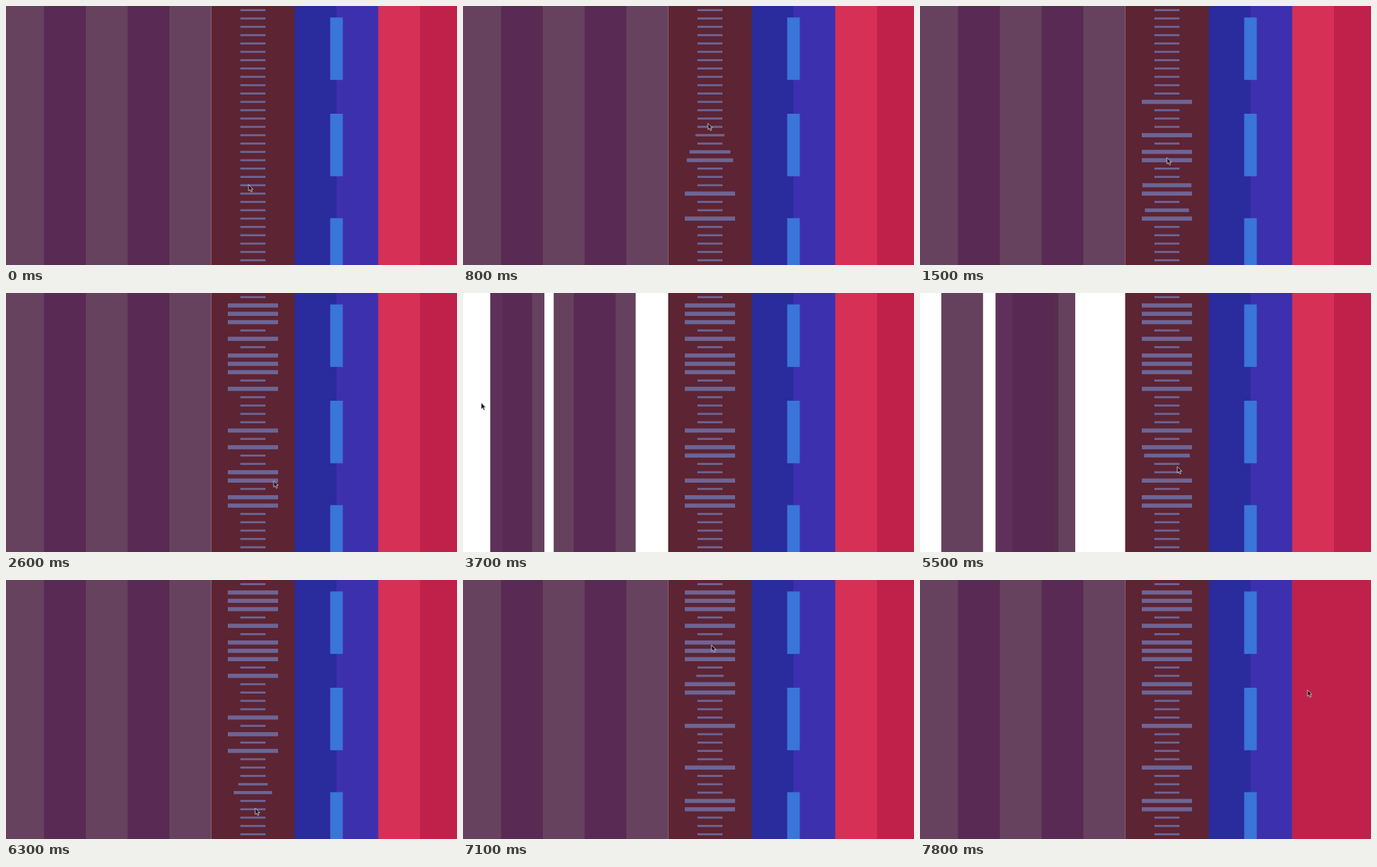
Write an HTML page with a canvas that moves like this. It is 610 px wide and 351 px high and loops after 8000 ms.

```html
<!DOCTYPE html>
<html lang="en">
<head>
<meta charset="utf-8">
<title>Interactive stripes</title>
<style>
html, body { margin: 0; width: 100%; height: 100%; overflow: hidden; background: #fff; }
canvas { display: block; }
</style>
</head>
<body>
<canvas id="stage" width="610" height="351"></canvas>
<script>
const ctx = document.getElementById('stage').getContext('2d');
const LOOP = 8000, W = 610, H = 351, COL = 56.5, TICKS = 31;

const slotX = slot => -5 + COL * slot;
const tickY = i => 5.6 + 11.3 * i;
const clamp = v => Math.min(1, Math.max(0, v));
const mix = (a, b, p) => a + (b - a) * p;
const ease = p => p * p * (3 - 2 * p);

function rect(x, y, w, h, color) {
  ctx.fillStyle = color;
  ctx.fillRect(x, y, w, h);
}

// Left strips: A, B and C are light, D and E dark; each shuffle leads to the next order.
const LIGHT = '#66425f', LIGHT_MOVING = 'rgba(85,45,77,.9)', DARK = 'rgba(89,41,84,.96)';
const orders = ['ADBEC', 'DCEBA', 'CDEBA', 'ABCED', 'ADCEB'];
const shuffleStarts = [3621, 3861, 5414, 5654];
const SHUFFLE_TIME = 240;

function drawStrips(t) {
  const n = shuffleStarts.filter(start => start <= t).length;
  const p = n ? clamp((t - shuffleStarts[n - 1]) / SHUFFLE_TIME) : 1;
  const moving = p < 1;
  const from = orders[Math.max(0, n - 1)], to = orders[n];

  rect(0, 0, slotX(5), H, moving ? '#fff' : LIGHT);
  for (const name of moving ? 'ABCDE' : 'DE') {
    const slot = mix(from.indexOf(name), to.indexOf(name), ease(p));
    rect(slotX(slot), 0, COL, H, name < 'D' ? LIGHT_MOVING : DARK);
  }
}

// Pointer stops: time, x, y, and the ticks it switches on the way there.
const stops = [
  [0, 328, 242],
  [100, 328, 242],
  [400, 336, 292, [22, 25]],
  [900, 330, 126, [18, 17, 15, 11]],
  [1150, 388, 338],
  [1320, 334, 236],
  [1380, 336, 290, [21, 24]],
  [1500, 334, 206],
  [1800, 336, 54, [17, 16, 15, 9, 8, 7, 5]],
  [2030, 335, 10, [3, 2, 1]],
  [2400, 415, 335],
  [2700, 336, 215, [21, 19]],
  [2900, 305, 20],
  [3200, 112, 240],
  [3400, 112, 240],
  [3700, 24.5, 149],
  [4100, 58, 94],
  [4250, 58, 94],
  [4650, 130, 335],
  [5100, 205, 180],
  [5300, 205, 180],
  [5500, 348, 235, [19, 20]],
  [5650, 344, 262, [22]],
  [6100, 334, 265],
  [6300, 337, 309, [24, 25]],
  [6420, 337, 325, [27]],
  [7050, 336, 88, [26, 22, 20, 18, 17, 16, 13, 12, 11]],
  [7200, 336, 88],
  [7780, 524, 149],
  [LOOP, 524, 149]
];

// A tick switches at the moment the pointer passes its height.
const flips = Array.from({ length: TICKS }, () => []);
const FLIP_TIME = 200;
stops.forEach(([t1, , y1, ticks = []], n) => {
  for (const i of ticks) {
    const [t0, , y0] = stops[n - 1];
    flips[i].push(mix(t0, t1, (tickY(i) - y0) / (y1 - y0)));
  }
});

function tickSize(i, t) {
  const past = flips[i].filter(start => start <= t);
  if (!past.length) return 0;
  const p = ease(clamp((t - past[past.length - 1]) / FLIP_TIME));
  return past.length % 2 ? p : 1 - p;
}

function drawTicks(t) {
  for (let i = 0; i < TICKS; i++) {
    const size = tickSize(i, t);
    const w = mix(34, 68, size), h = mix(2.7, 5.6, size);
    rect(334 - w / 2, tickY(i) - h / 2, w, h, '#6d6595');
  }
}

// Each column runs to the right edge, so that neighbours join without a seam.
function column(slot, color) {
  rect(slotX(slot), 0, W, H, color);
}

function drawColumns(t) {
  const p = clamp((t - 7600) / 150);
  column(5, '#5d2433');
  column(7, '#2a2b9c');
  column(8, '#3d30ae');
  column(9, '#d63056');
  ctx.globalAlpha = p;
  column(9, '#c0214a');
  ctx.globalAlpha = 1;
  column(10, '#c0214a');
  for (const y of [15.5, 146, 287.5]) rect(438.5, y, 17, 84.7, '#3a75da');
}

const arrow = new Path2D('M0 0V8.5L2 6.8L3.4 10L5 9.3L3.6 6.2H6.2Z');

function drawPointer(t) {
  const n = stops.findIndex(stop => stop[0] > t);
  const [t0, x0, y0] = stops[n - 1], [t1, x1, y1] = stops[n];
  const p = (t - t0) / (t1 - t0);
  ctx.save();
  ctx.translate(mix(x0, x1, p), mix(y0, y1, p));
  ctx.fillStyle = '#1d121f';
  ctx.fill(arrow);
  ctx.lineWidth = 0.8;
  ctx.strokeStyle = '#d8cfd8';
  ctx.stroke(arrow);
  ctx.restore();
}

const began = performance.now();

function draw() {
  const t = Math.max(0, performance.now() - began) % LOOP;
  ctx.clearRect(0, 0, W, H);
  drawStrips(t);
  drawColumns(t);
  drawTicks(t);
  drawPointer(t);
  requestAnimationFrame(draw);
}
draw();
</script>
</body>
</html>
```
